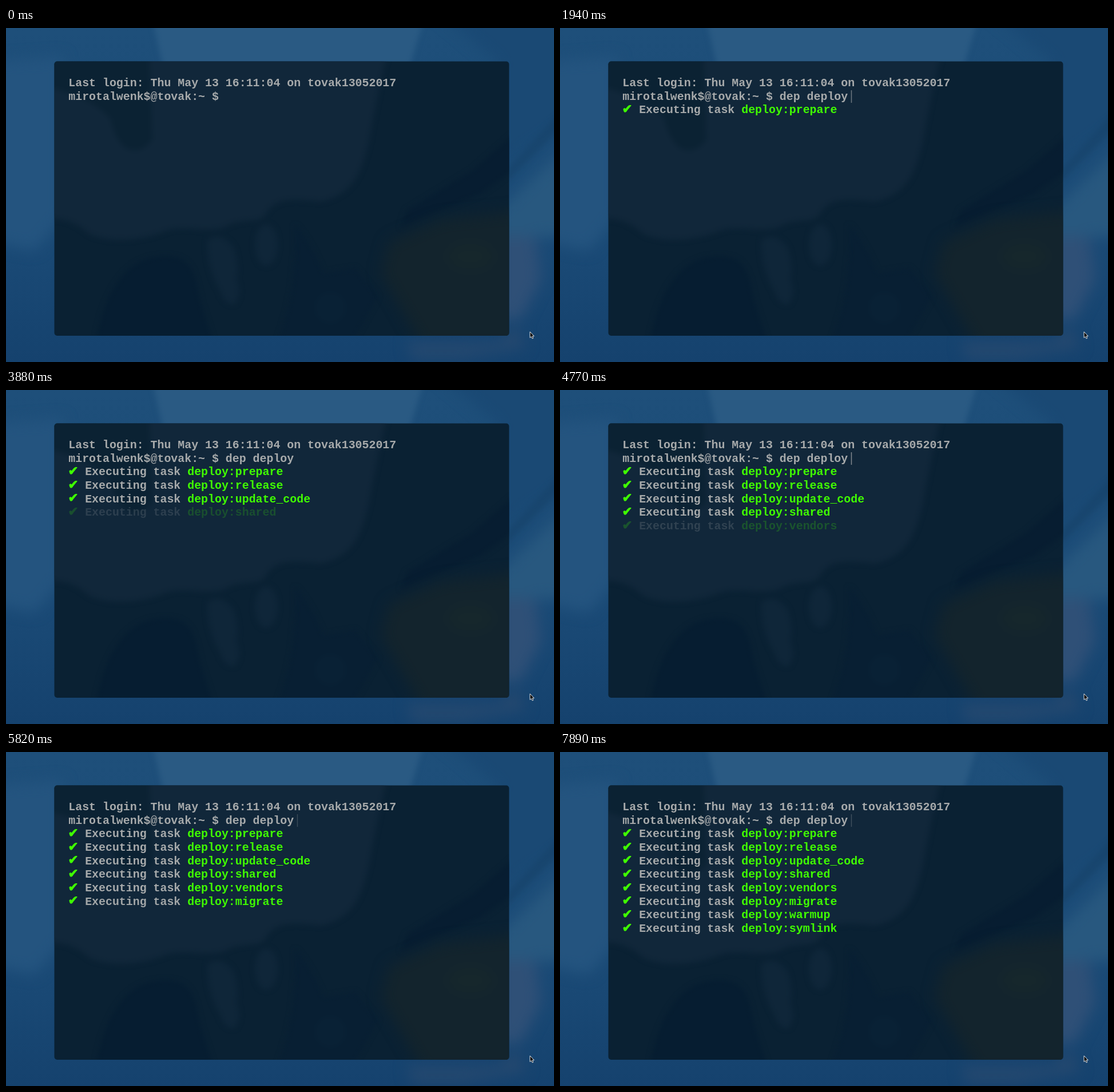
Recreate the animation shown at these times as an HTML page. Size 958x585 px, loop 8 s.

```html
<!DOCTYPE html>
<html lang="en">
<head>
<meta charset="utf-8">
<title>Deploy terminal</title>
<style>
  html, body { margin: 0; width: 100%; height: 100%; overflow: hidden; background: #1b4a75; }
  svg { display: block; width: 958px; height: 585px; }
  text { font: bold 19.9px "Courier New", "Liberation Mono", monospace; fill: #a7aaab; white-space: pre; }
  .ok { fill: #40ff00; }
  .check { font: 21.5px "DejaVu Sans", sans-serif; stroke: #40ff00; stroke-width: 1; }
</style>
</head>
<body>
<svg viewBox="0 0 958 585">
  <defs>
    <filter id="wide" x="-30%" y="-30%" width="160%" height="160%" color-interpolation-filters="sRGB"><feGaussianBlur stdDeviation="12"/></filter>
    <filter id="soft" x="-30%" y="-30%" width="160%" height="160%" color-interpolation-filters="sRGB"><feGaussianBlur stdDeviation="5"/></filter>
    <clipPath id="pane"><rect x="84.5" y="58.5" width="795" height="480.5" rx="5"/></clipPath>
    <linearGradient id="sky" x2="0" y2="1">
      <stop offset="0" stop-color="#1e4f7a"/>
      <stop offset=".6" stop-color="#1b4b77"/>
      <stop offset="1" stop-color="#15426e"/>
    </linearGradient>
  </defs>

  <!-- wallpaper -->
  <rect width="958" height="585" fill="url(#sky)"/>
  <g filter="url(#wide)">
    <path d="M-40 60L100 50V330L50 390L-40 370Z" fill="#24547f"/>
    <path d="M740 -40H1000V150L860 250V60Z" fill="#1a4974"/>
    <path d="M1000 190L860 320V365H1000Z" fill="#28587f"/>
    <path d="M860 365H925L935 440L900 510H860Z" fill="#2f5077"/>
    <path d="M700 550H860L890 520L910 560L800 580H710Z" fill="#24486f"/>
  </g>
  <path d="M250 -40H738L705 70H275Z" fill="#2a5a83" filter="url(#soft)"/>
  <path d="M970 145L860 265V285L970 175Z" fill="#164269" opacity=".6" filter="url(#soft)"/>

  <!-- terminal pane -->
  <g clip-path="url(#pane)">
    <rect x="84" y="58" width="796" height="482" fill="#0a2133"/>
    <g filter="url(#soft)">
      <path d="M60 40H668C655 90 643 150 635 195C623 250 608 292 550 304C510 300 470 295 455 325C445 345 410 330 380 350C340 358 310 345 280 355C240 372 180 378 145 360C120 338 100 333 60 333Z" fill="#11273a"/>
      <path d="M60 40H250L256 195Q238 222 210 211Q190 195 183 160Q150 120 60 100Z" fill="#0b2233"/>
      <path d="M352 372Q375 355 398 385Q408 415 403 440Q414 470 398 484Q380 482 374 460Q350 420 352 372Z" fill="#0f2639"/>
      <ellipse cx="455" cy="380" rx="20" ry="36" fill="#0f2639"/>
      <path d="M155 560C170 470 205 398 280 400C325 400 330 430 340 480L365 560Z" fill="#061d31"/>
      <path d="M505 345Q530 370 555 430L610 420L650 470L600 560H470Q510 470 505 345Z" fill="#081f33"/>
      <path d="M900 175L815 250L700 320L690 350L760 320L830 290L900 240Z" fill="#071d31"/>
      <circle cx="567" cy="490" r="27" fill="#092135"/>
    </g>
    <g filter="url(#wide)">
      <path d="M670 375L760 335L900 320V560H730L655 430Z" fill="#13242d"/>
      <ellipse cx="812" cy="400" rx="40" ry="22" fill="#16272c"/>
    </g>
  </g>

  <text x="109.3" y="102">Last login: Thu May 13 16:11:04 on tovak13052017</text>
  <text x="109.3" y="125.7">mirotalwenk$@tovak:~ $ <tspan id="typed"></tspan></text>
  <rect id="caret" y="109" width="1.5" height="22" fill="#a7aaab"/>
  <g id="tasks"></g>
  <path d="M916 532V542.5L918.4 540.4L920 544L921.8 543.2L920.2 539.7H923.2Z" fill="#000" stroke="#e4e8ec" stroke-width="1"/>
</svg>
<script>
const LOOP = 8000, STEP = 148.9, CHAR = 11.94, LINE = 23.67;
const COMMAND = "dep deploy";
const TASKS = [
  ["prepare", 1610], ["release", 2200], ["update_code", 3100], ["shared", 3840],
  ["vendors", 4730], ["migrate", 5620], ["warmup", 6510], ["symlink", 7400]
];
const $ = id => document.getElementById(id);
const clamp = v => Math.max(0, Math.min(1, v));

$("tasks").innerHTML = TASKS.map(([name], i) => {
  const y = 102 + (i + 2) * LINE;
  return `<g><text class="ok check" x="108.6" y="${y - .2}">✔</text>` +
    `<text x="138.2" y="${y}">Executing task <tspan class="ok">deploy:${name}</tspan></text></g>`;
}).join("");
const rows = [...$("tasks").children];

// The CSS "ease" curve, solved by bisection
function ease(x) {
  const bez = (a, b, u) => 3 * a * u * (1 - u) ** 2 + 3 * b * u * u * (1 - u) + u ** 3;
  let lo = 0, hi = 1;
  for (let i = 0; i < 16; i++) {
    const mid = (lo + hi) / 2;
    if (bez(.25, .25, mid) < x) lo = mid; else hi = mid;
  }
  return bez(.1, 1, lo);
}

function blink(t) {
  const p = (t + 640) % 700 / 350;
  return p < 1 ? 1 - ease(p) : ease(p - 1);
}

function draw(now) {
  // The screen refreshes in even steps
  const n = Math.floor((now % LOOP + 5) / STEP), t = n * 149.1;
  const count = Math.min(COMMAND.length, Math.round(n * 1.7));
  $("typed").textContent = COMMAND.slice(0, count);
  $("caret").setAttribute("x", 108.9 + (23 + count) * CHAR + 5.8);
  $("caret").setAttribute("opacity", n ? blink(t) : 0);
  rows.forEach((row, i) => row.setAttribute("opacity", clamp((t - TASKS[i][1]) / 200)));
}

const start = performance.now();
function tick() {
  draw(performance.now() - start);
  requestAnimationFrame(tick);
}
tick();
</script>
</body>
</html>
```
